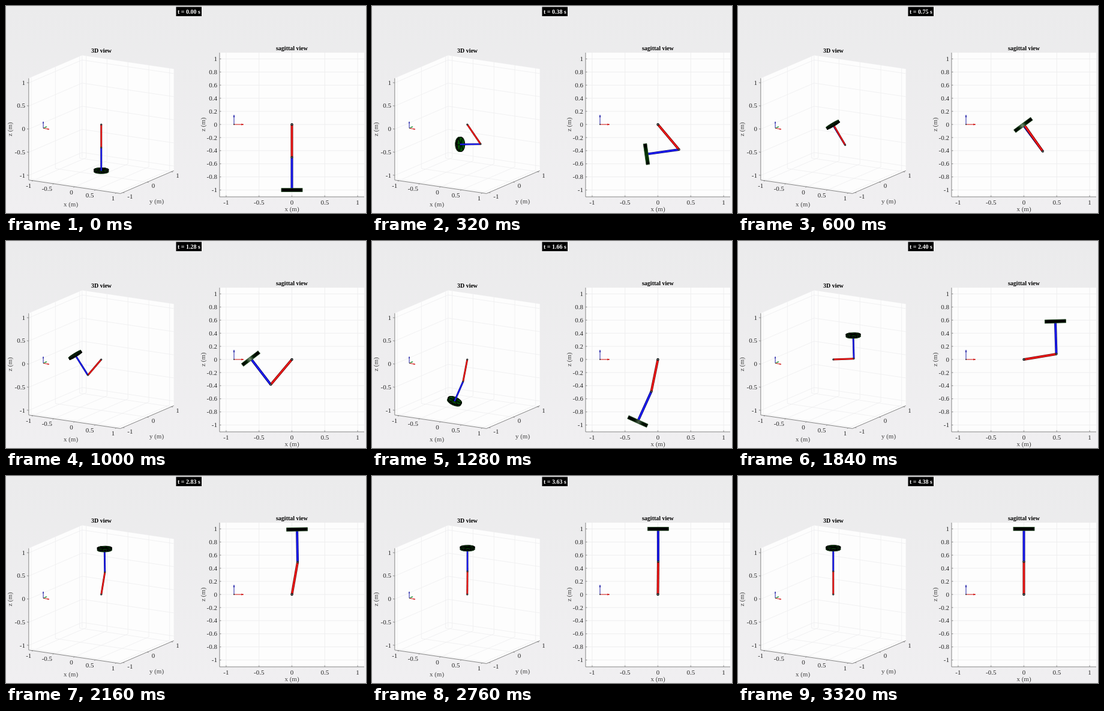
Recreate the animation shown at these times as an HTML page with a canvas. Size 600 by 346 pixels, loop 3.36 s.

```html
<!DOCTYPE html>
<html>
<head>
<meta charset="utf-8">
<style>
html, body { margin: 0; width: 100%; height: 100%; overflow: hidden; background: #eeedef; }
canvas { display: block; }
</style>
</head>
<body>
<canvas id="stage" width="600" height="346"></canvas>
<script>
const g = document.getElementById('stage').getContext('2d');
const SERIF = '"Liberation Serif", "Times New Roman", serif';
const STEP = 40, COUNT = 84, LIM = 1.1, LINK = 0.5, RADIUS = 0.16, HALF = 0.026;

// Pose keys: step, upper link angle, lower link angle (degrees from straight down)
const KEYS = [
  [0, 0, 0], [1, 0, 0], [5, 14, -30], [8, 40, -82], [11, 62, -118], [13, 56, -130],
  [15, 35, -143.5], [18, -8, -178], [20, -31, -190], [22, -43, -184], [25, -40, -142.5],
  [28, -33, -90], [33, -6, -8], [36, 10, 42], [39, 26.5, 92.2], [42, 48, 150],
  [45, 85, 177], [48, 128, 186], [51, 157, 184.5], [54, 170, 181], [57, 174, 180.5],
  [61, 177.5, 180.3], [69, 179.5, 180.1], [83, 180, 180]
];

// Cubic Hermite through the keys
function angle(n, col) {
  let i = 0;
  while (i < KEYS.length - 2 && KEYS[i + 1][0] <= n) i++;
  const slope = j => {
    const a = KEYS[Math.max(j - 1, 0)], b = KEYS[Math.min(j + 1, KEYS.length - 1)];
    return (b[col] - a[col]) / (b[0] - a[0]);
  };
  const a = KEYS[i], b = KEYS[i + 1], w = b[0] - a[0], u = (n - a[0]) / w, v = 1 - u;
  const deg = a[col] * (1 + 2 * u) * v * v + b[col] * (3 - 2 * u) * u * u
    + w * u * v * (slope(i) * v - slope(i + 1) * u);
  return deg * Math.PI / 180;
}

const flat = (x, y, z) => [476.5 + 109.6 * x, 198 - 109.6 * z];
const space = (x, y, z) => [
  158.8 + 69.5 * x + 40.4 * y,
  198 + 10.3 * x - 17.4 * y - 77.3 * z
];

function path(pts, close) {
  g.beginPath();
  pts.forEach(p => g.lineTo(p[0], p[1]));
  if (close) g.closePath();
}
function line(pts, color, width = 1) {
  path(pts);
  g.strokeStyle = color;
  g.lineWidth = width;
  g.stroke();
}
function fill(pts, color) {
  path(pts, true);
  g.fillStyle = color;
  g.fill();
}
function dot(p, r, color) {
  g.beginPath();
  g.arc(p[0], p[1], r, 0, 7);
  g.fillStyle = color;
  g.fill();
}
function text(s, x, y, { size = 11, align = 'center', color = '#262626', bold = false, turn = 0 } = {}) {
  g.save();
  g.translate(x, y);
  g.rotate(turn);
  g.font = `${bold ? 'bold ' : ''}${size}px ${SERIF}`;
  g.textAlign = align;
  g.textBaseline = 'alphabetic';
  g.fillStyle = color;
  g.fillText(s, 0, size * 0.33);
  g.restore();
}
function arrow(a, b, color, head) {
  line([a, b], color, 1);
  const t = Math.atan2(b[1] - a[1], b[0] - a[0]);
  const side = s => [b[0] - head * Math.cos(t + s), b[1] - head * Math.sin(t + s)];
  fill([b, side(0.38), side(-0.38)], color);
}

const GRID = '#eeeeef', AXIS = '#777';
const LABEL = { color: '#444' }, TITLE = { size: 10, bold: true, color: '#000' };
const RED = '#d01010', GREEN = '#108a28', BLUE = '#2424a8';

function drawBox() {
  const L = LIM;
  fill([space(-L, -L, L), space(-L, L, L), space(L, L, L), space(L, L, -L),
    space(L, -L, -L), space(-L, -L, -L)], '#fdfdfd');
  for (const v of [-1, -0.5, 0, 0.5, 1]) {
    line([space(v, -L, -L), space(v, L, -L), space(v, L, L)], GRID, 0.8);
    line([space(-L, -L, v), space(-L, L, v), space(L, L, v)], GRID, 0.8);
    if (v % 1 === 0) line([space(L, v, -L), space(-L, v, -L), space(-L, v, L)], GRID, 0.8);
  }
  line([space(-L, L, L), space(-L, L, -L)], GRID, 0.8);
  line([space(-L, -L, L), space(-L, -L, -L), space(L, -L, -L), space(L, L, -L)], AXIS, 0.9);

  [-1, -0.5, 0, 0.5, 1].forEach((v, i) => {
    const [px, py] = space(v, -L, -L), [qx, qy] = space(-L, -L, v);
    line([[px, py], [px - 2, py + 1]], AXIS, 0.8);
    line([[qx, qy], [qx - 3, qy - 0.5]], AXIS, 0.8);
    text(v, px - 2.5, py + 8.8, { align: 'right' });
    text(v, 32, 283.5 - 38.9 * i, { align: 'right' });
    if (i % 2 === 0) {
      const [rx, ry] = space(L, v, -L);
      line([[rx, ry], [rx + 2.5, ry + 0.5]], AXIS, 0.8);
      text(v, rx + 7.5, ry + 6.5, { align: 'left' });
    }
  });
  text('3D view', 159, 75, TITLE);
  text('x (m)', 108, 331, LABEL);
  text('y (m)', 251, 326.5, LABEL);
  text('z (m)', 6, 206, { ...LABEL, turn: -Math.PI / 2 });

  const o = space(-0.88, -0.88, 0);
  arrow(o, [o[0] + 10, o[1] + 1.8], RED, 3);
  arrow(o, [o[0] + 6, o[1] - 2.6], GREEN, 3);
  arrow(o, [o[0], o[1] - 11], BLUE, 3);
}

function drawPlane() {
  g.fillStyle = '#fdfdfd';
  g.fillRect(356, 78, 241, 241);
  for (let i = -5; i <= 5; i++) {
    const v = i / 5, y = 198 - 109.6 * v;
    line([[356, y], [597, y]], GRID);
    line([[356, y], [358.5, y]], AXIS, 0.8);
    text(v, 352, y, { align: 'right' });
  }
  for (const v of [-1, -0.5, 0, 0.5, 1]) {
    const x = 476.5 + 109.6 * v;
    line([[x, 78], [x, 319]], GRID);
    line([[x, 319], [x, 316.5]], AXIS, 0.8);
    text(v, x, 328, {});
  }
  line([[356, 78], [356, 319], [597, 319]], AXIS, 0.9);
  text('sagittal view', 476.5, 71, TITLE);
  text('x (m)', 476.5, 339.5, LABEL);
  text('z (m)', 328, 198, { ...LABEL, turn: -Math.PI / 2 });
  arrow([380, 198], [396, 198], RED, 4);
  arrow([380, 198], [380, 182], BLUE, 4);
  dot([380, 198], 1, '#333');
}

function rod(a, b, dark, bright, width) {
  line([a, b], dark, width);
  line([a, b], bright, width * 0.66);
}
function joint(p, r) {
  dot(p, r, '#1c1c1c');
  dot(p, r * 0.45, '#708080');
}

// Edge-on wheel with a sheen that grows with its tilt
function wheelFlat(c, a) {
  const [x, y] = flat(c[0], 0, c[1]);
  const w = RADIUS * 109.6, h = HALF * 109.6;
  const sheen = 120 * Math.sin(2 * a) ** 2, green = 45 * Math.abs(Math.sin(a));
  g.save();
  g.translate(x, y);
  g.rotate(-a);
  const shade = g.createLinearGradient(-w, 0, w, 0);
  shade.addColorStop(0.1, '#000');
  shade.addColorStop(0.35, `rgb(0,${green},0)`);
  shade.addColorStop(0.55, `rgb(${sheen},${green + sheen},${sheen})`);
  shade.addColorStop(0.75, `rgb(0,${green},0)`);
  shade.addColorStop(0.95, '#020602');
  g.fillStyle = shade;
  g.fillRect(-w, -h, 2 * w, 2 * h);
  g.strokeStyle = '#265026';
  g.lineWidth = 0.8;
  g.strokeRect(-w, -h, 2 * w, 2 * h);
  g.restore();
}

function wheelSpace(c, a, facing) {
  const d = [Math.sin(a), -Math.cos(a)], near = facing < 0 ? -1 : 1;
  const at = (phi, r, side) => {
    const u = r * Math.cos(phi), s = side * HALF * 0.9;
    return space(c[0] + u * Math.cos(a) + s * d[0], r * Math.sin(phi),
      c[1] + u * Math.sin(a) + s * d[1]);
  };
  const R = RADIUS * 0.95;
  const ring = (r, side) => Array.from({ length: 17 }, (_, i) => at(i * Math.PI / 8, r, side));
  const back = ring(R, -near), front = ring(R, near);
  for (let i = 0; i < 16; i++) {
    const quad = [back[i], back[i + 1], front[i + 1], front[i]];
    fill(quad, '#030803');
    line(quad, '#030803', 0.6);
  }
  line(back, '#0c3d0c', 0.8);
  fill(front, `rgb(0,${10 + 230 * Math.max(0, Math.abs(facing) - 0.2)},0)`);
  line(front, '#020602', 1.1);
  line(ring(R * 0.8, near), '#126012', 0.7);
  for (let k = 0; k < 3; k++) {
    const phi = 0.4 + k * Math.PI / 3;
    line([at(phi, R, near), at(phi + Math.PI, R, near)], '#000', 1.2);
  }
}

function drawRobot(n) {
  const a1 = angle(n, 1), a2 = angle(n, 2);
  const knee = [LINK * Math.sin(a1), -LINK * Math.cos(a1)];
  const foot = [knee[0] + LINK * Math.sin(a2), knee[1] - LINK * Math.cos(a2)];
  const facing = 0.46 * Math.sin(a2) - 0.27 * Math.cos(a2);

  const links = (view, width) => {
    const [p, k, f] = [[0, 0], knee, foot].map(q => view(q[0], 0, q[1]));
    rod(k, f, '#00006a', '#1c1cf4', width);
    rod(p, k, '#6a0000', '#f01818', width);
    joint(k, width * 0.5);
    joint(p, width * 0.55);
  };
  const wheelBehind = facing < -0.1;
  if (wheelBehind) wheelSpace(foot, a2, facing);
  links(space, 2.9);
  if (!wheelBehind) wheelSpace(foot, a2, facing);

  links(flat, 4);
  wheelFlat(foot, a2);
}

function drawClock(n) {
  const t = 0.012564 * Math.max(0, Math.floor(4.25 * n - 3.75));
  g.fillStyle = '#000';
  g.fillRect(283.5, 1.5, 42.5, 15.5);
  text(`t = ${t.toFixed(2)} s`, 305, 9.5, { ...TITLE, color: '#fff' });
}

const backdrop = g.createLinearGradient(0, 0, 0, 346);
backdrop.addColorStop(0, '#ebebec');
backdrop.addColorStop(1, '#f0eff1');

function draw() {
  const n = Math.floor(performance.now() / STEP) % COUNT;
  g.fillStyle = backdrop;
  g.fillRect(0, 0, 600, 346);
  drawBox();
  drawPlane();
  drawRobot(n);
  drawClock(n);
  requestAnimationFrame(draw);
}
draw();
</script>
</body>
</html>
```
